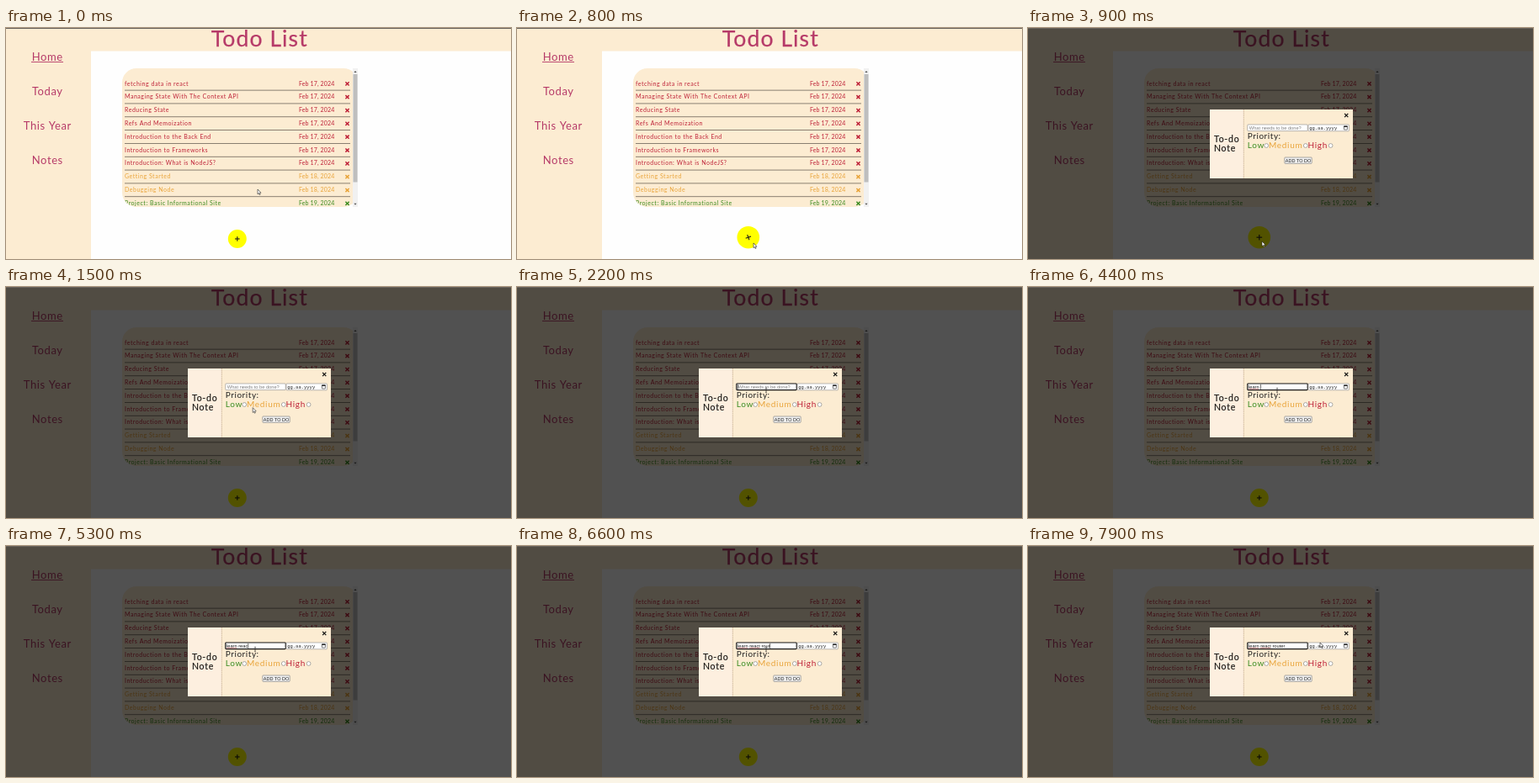
Recreate the animation shown at these times as an HTML page with a canvas. Size 600 by 275 pixels, loop 8000 ms.

```html
<!DOCTYPE html>
<html lang="en">
<head>
<meta charset="utf-8">
<title>Todo List</title>
<style>
  html, body { margin: 0; width: 100%; height: 100%; overflow: hidden; background: #fff; }
  canvas { display: block; width: 600px; height: 275px; }
</style>
</head>
<body>
<canvas id="stage"></canvas>
<script>
const W = 600, H = 275, LOOP = 8000;
const canvas = document.getElementById('stage');
const ctx = canvas.getContext('2d');
const dpr = window.devicePixelRatio || 1;
canvas.width = W * dpr;
canvas.height = H * dpr;

const CREAM = '#fcecd2', PINK = '#b63a68';
const RED = '#be2238', ORANGE = '#e9a43a', GREEN = '#3c8c22';
const ROUND = 'Lato, sans-serif', ARIAL = '"Liberation Sans", sans-serif';

const items = [
  ['fetching data in react', 17, RED],
  ['Managing State With The Context API', 17, RED],
  ['Reducing State', 17, RED],
  ['Refs And Memoization', 17, RED],
  ['Introduction to the Back End', 17, RED],
  ['Introduction to Frameworks', 17, RED],
  ['Introduction: What is NodeJS?', 17, RED],
  ['Getting Started', 18, ORANGE],
  ['Debugging Node', 18, ORANGE],
  ['Project: Basic Informational Site', 19, GREEN]
];

const typed = 'learn react router';
const keyTimes = [2900, 3100, 3300, 3700, 4000, 4200, 4500, 4700, 4800,
  5100, 5500, 5800, 6100, 6200, 6400, 6500, 6700, 6800];

// time, x, y of the pointer tip
const path = [[0, 299, 192], [100, 299, 192], [450, 293, 224], [800, 281, 256],
  [900, 278, 254], [1000, 279, 248], [1600, 296, 123], [7600, 296, 123],
  [7900, 347, 115], [8000, 347, 115]];

const clamp = v => Math.max(0, Math.min(1, v));
const easeOut = v => 1 - (1 - clamp(v)) ** 2;

function rect(x, y, w, h, color) {
  ctx.fillStyle = color;
  ctx.fillRect(x, y, w, h);
}

function line(points, color, width = 1) {
  ctx.beginPath();
  points.forEach(([x, y]) => ctx.lineTo(x, y));
  ctx.strokeStyle = color;
  ctx.lineWidth = width;
  ctx.stroke();
}

function circle(x, y, r, fill, stroke) {
  ctx.beginPath();
  ctx.arc(x, y, r, 0, Math.PI * 2);
  ctx.fillStyle = fill;
  ctx.fill();
  if (stroke) {
    ctx.strokeStyle = stroke;
    ctx.lineWidth = 0.6;
    ctx.stroke();
  }
}

function box(x, y, w, h, fill, stroke, width, r = 0.8) {
  ctx.beginPath();
  ctx.roundRect(x, y, w, h, r);
  ctx.fillStyle = fill;
  ctx.fill();
  ctx.strokeStyle = stroke;
  ctx.lineWidth = width;
  ctx.stroke();
}

function text(str, x, y, size, color, { family = ROUND, gap = 0, align = 'left', soft = 0 } = {}) {
  ctx.font = `${size}px ${family}`;
  ctx.letterSpacing = gap + 'px';
  ctx.textAlign = align;
  ctx.fillStyle = color;
  ctx.fillText(str, x, y);
  if (soft) {
    ctx.strokeStyle = color;
    ctx.lineWidth = soft;
    ctx.strokeText(str, x, y);
  }
  return ctx.measureText(str).width;
}

function cross(x, y, r, color, width) {
  line([[x - r, y - r], [x + r, y + r]], color, width);
  line([[x - r, y + r], [x + r, y - r]], color, width);
}

function triangle(x, y, dir) {
  ctx.beginPath();
  ctx.moveTo(x - 1.6, y + dir);
  ctx.lineTo(x + 1.6, y + dir);
  ctx.lineTo(x, y - dir);
  ctx.fillStyle = '#505050';
  ctx.fill();
}

function drawPage() {
  rect(0, 0, W, H, '#fefefe');
  rect(0, 0, W, 27.5, CREAM);
  rect(0, 0, 101, H, CREAM);
  text('Todo List', 243.8, 22, 26.5, PINK, { gap: 1.1, soft: 0.25 });
  ['Home', 'Today', 'This Year', 'Notes'].forEach((name, i) =>
    text(name, 49.3, 38.5 + i * 41.1, 13, PINK, { gap: 0.6, align: 'center' }));
  rect(30, 40, 38, 0.9, PINK);
}

function drawList() {
  ctx.save();
  ctx.beginPath();
  ctx.roundRect(138, 48, 280, 165, 17);
  ctx.clip();
  rect(138, 48, 280, 165, CREAM);
  items.forEach(([name, day, color], i) => {
    const y = 66 + i * 15.83;
    text(name, 141, y + 2.5, 7, color, { gap: 0.52 });
    text(`Feb ${day}, 2024`, 390.4, y + 2.5, 7, color, { gap: 0.14, align: 'right' });
    cross(405.5, y + 0.4, 2.1, color, 1.5);
    rect(141, y + 7.7, 268, 0.8, '#6d6459');
  });
  ctx.restore();
  rect(412, 48, 6, 165, '#f1f1f1');
  rect(412.5, 55, 5, 128.5, '#bebebe');
  triangle(415, 52, 1);
  triangle(415, 209.8, -1);
}

function drawAdd(t) {
  const grow = t < 1000 ? easeOut((t - 600) / 200) : 1 - easeOut((t - 1000) / 300);
  const turn = t < 1000 ? easeOut((t - 600) / 300) : 1 - easeOut((t - 1000) / 300);
  ctx.save();
  ctx.translate(274.8, 251 - 1.8 * grow);
  circle(0, 0, 11 + 2.3 * grow, '#ffff00');
  ctx.rotate(turn * Math.PI);
  const r = 2.8 + 0.5 * grow;
  line([[-r, 0], [r, 0]], '#2c2a18', 1.2);
  line([[0, -r], [0, r]], '#2c2a18', 1.2);
  ctx.restore();
}

function squiggle(x, width) {
  const points = [];
  for (let i = 0; i <= width; i += 0.75) points.push([x + i, 121.4 + 0.35 * Math.sin(i * 2.8)]);
  line(points, '#d84a4a', 0.5);
}

function drawInput(t) {
  const opts = { family: ARIAL };
  const focused = t >= 1800;
  const x = 262, base = 120.7;
  const count = keyTimes.filter(k => k <= t).length;
  box(260.8, 115, 71.4, 7.6, '#fff', focused ? '#151515' : '#8a8a8a', focused ? 1.2 : 0.6);
  if (!count) text('What needs to be done?', x + 0.8, base, 5.7, '#808080', opts);
  const width = count ? text(typed.slice(0, count), x, base, 5.7, '#222', opts) : 0;
  const measure = s => ctx.measureText(s).width;
  if (count > 5) squiggle(x, measure('learn'));
  if (count > 11) squiggle(x + measure('learn '), measure('react'));
  const lastKey = count ? keyTimes[count - 1] : 1800;
  if (focused && t < 7200 && (t - lastKey) % 1000 < 500) rect(x + width + 0.2, 116, 0.6, 5.8, '#111');
}

function drawDate() {
  box(333, 115, 48.4, 7.8, '#fff', '#8a8a8a', 0.6);
  text('gg.aa.yyyy', 334.2, 120.7, 5.5, '#222', { family: '"Liberation Mono", monospace' });
  box(375.4, 117, 4, 4, '#fff', '#222', 0.6, 0.3);
  rect(375.2, 116.6, 4.4, 1.4, '#222');
}

function drawDialog(t) {
  rect(0, 0, W, H, 'rgba(0,0,0,0.68)');
  rect(216, 97, 170, 82, CREAM);
  rect(216, 97, 40, 82, '#fdefdf');
  ctx.setLineDash([1.4, 0.8]);
  line([[256.3, 97], [256.3, 179]], '#b9a083', 0.7);
  ctx.setLineDash([]);
  text('To-do', 221, 135.5, 10.5, '#181614', { gap: 0.75, soft: 0.15 });
  text('Note', 221, 147, 10.5, '#181614', { gap: 0.75, soft: 0.15 });
  cross(378.2, 104, 2.1, '#111', 1.3);
  drawInput(t);
  drawDate();
  text('Priority:', 260.8, 132, 10, '#222', { gap: 0.55 });
  [['Low', 260.8, GREEN, 283.2], ['Medium', 286, ORANGE, 329.8], ['High', 332.4, RED, 359.6]]
    .forEach(([name, x, color, dot]) => {
      text(name, x, 143.2, 10, color, { gap: 0.7 });
      circle(dot, 140, 2.4, '#fff', '#777');
    });
  box(304.8, 154, 32.4, 7.4, '#efefef', '#777', 0.6);
  text('ADD TO DO', 321, 159.8, 5.5, '#222', { family: ARIAL, align: 'center' });
}

function pointerAt(t) {
  const i = path.findIndex(p => p[0] > t);
  const [t0, x0, y0] = path[i - 1], [t1, x1, y1] = path[i];
  const k = (t - t0) / (t1 - t0);
  return [x0 + (x1 - x0) * k, y0 + (y1 - y0) * k];
}

function drawPointer(t) {
  const [x, y] = pointerAt(t);
  ctx.save();
  ctx.translate(x, y);
  if (t >= 1600 && t < 7750) {
    line([[0, -2.5], [0, 2.5]], '#222', 0.7);
    line([[-1, -2.7], [1, -2.7]], '#222', 0.5);
    line([[-1, 2.7], [1, 2.7]], '#222', 0.5);
  } else {
    ctx.beginPath();
    [[0, 0], [0, 5.8], [1.3, 4.6], [2.2, 6.6], [3.1, 6.2], [2.3, 4.3], [4, 4.2]]
      .forEach(p => ctx.lineTo(...p));
    ctx.closePath();
    ctx.fillStyle = '#fff';
    ctx.fill();
    ctx.strokeStyle = '#222';
    ctx.lineWidth = 0.6;
    ctx.stroke();
  }
  ctx.restore();
}

function draw(now) {
  const t = now % LOOP;
  ctx.setTransform(dpr, 0, 0, dpr, 0, 0);
  ctx.lineJoin = 'round';
  drawPage();
  drawList();
  drawAdd(t);
  if (t >= 900) drawDialog(t);
  // window edge, never dimmed
  rect(0, 0, W, 1, '#68625c');
  drawPointer(t);
}

const start = performance.now();
function tick() {
  draw(performance.now() - start);
  requestAnimationFrame(tick);
}
tick();
</script>
</body>
</html>
```
